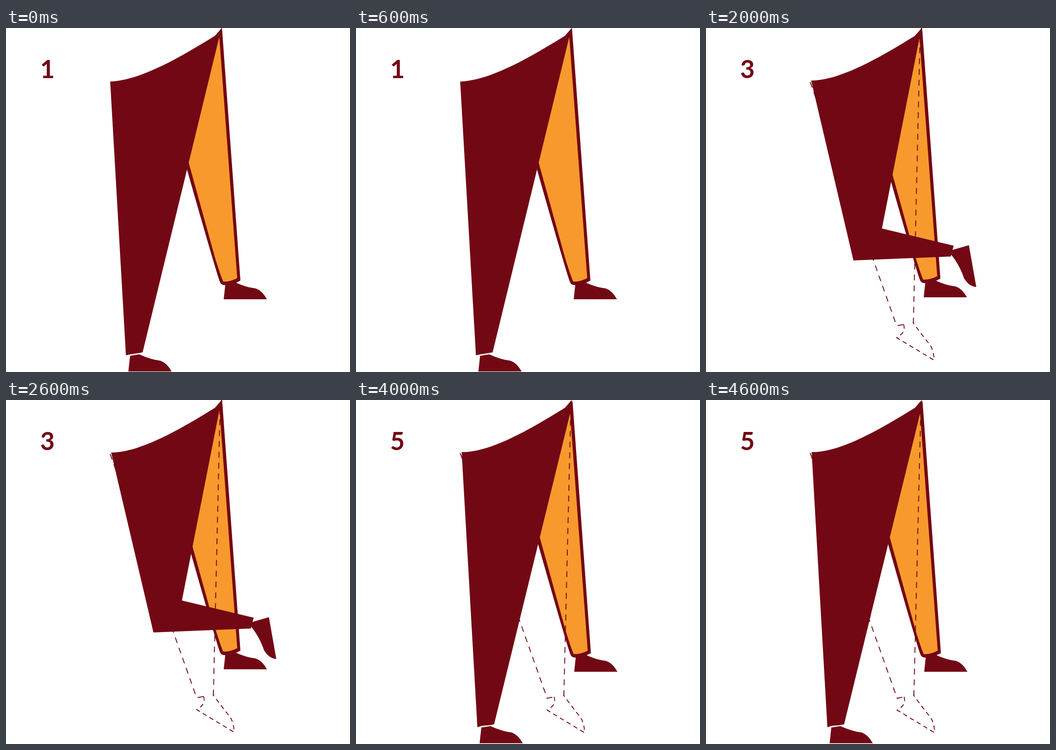
Write an HTML page that moves like this. It is 700 px wide and 700 px high and loops after 5 s.

```html
<!DOCTYPE html>
<html lang="en">
<head>
<meta charset="utf-8">
<title>Leg swing in five steps</title>
<style>
  html, body { margin: 0; width: 100%; height: 100%; overflow: hidden; background: #fff; }
  svg { display: block; width: 100vw; height: 100vh; fill: #720814; }
  text { font: bold 51px Lato, sans-serif; }
  .lining { fill: #f8992d; }
  #ghost { fill: none; stroke: #720814; stroke-width: 1.8; }
  #ghostLeg { stroke-dasharray: 12 10; }
  #ghostFoot { stroke-dasharray: 9 7; }
</style>
</head>
<body>
<svg viewBox="0 0 700 700">
  <text id="label" x="69.5" y="102"></text>
  <g id="back">
    <path d="M439.5 0L477 514L467 519Q455 524 443 523Q437 522 435 516Q428 498 368 287L350 225Z"/>
    <path class="lining" d="M434 18L470.500 509Q455 517 442 516Q437 505 425.500 468L372 275L360 230Z"/>
    <path id="backShoe"/>
  </g>
  <path id="leg"/>
  <path id="foot"/>
  <g id="ghost"><path id="ghostLeg"/><path id="ghostFoot"/></g>
</svg>
<script>
const $ = id => document.getElementById(id);
const move = (id, [x, y]) => $(id).setAttribute('transform', `translate(${x} ${y})`);
const draw = (id, d) => $(id).setAttribute('d', d);

const shoe = 'M446.500 520L443 552H531Q521 534 508 530Q489 528 465 517';
const tipped = 'M402 601Q408 617 388 628L464 674Q464 656 456 643Q438 621 421 597';
const lifted = 'M500 452L535 442L550 527Q535 526 525 509Q516 482 498 460';

// front: hip to hem; rear: hem to waist; ghost: shift of the previous pose's outline
const poses = [
  { front: '212 109L244 666L254 664', rear: '267 662L278 660L434 18',
    foot: shoe, footAt: [-194, 147], backAt: [0, 0] },
  { front: '212 108L388 604L403 601', rear: '421 597L422 598L435.500 20',
    foot: tipped, footAt: [0, 0], backAt: [-1, 0], ghost: [1, 0] },
  { front: '214 107L300 473L498 465', rear: '504 443L358 408L434 22',
    foot: lifted, footAt: [0, 0], backAt: [0, -4], ghost: [0, 2] },
  { front: '211 107L388 606L403 603', rear: '421 599L422 600L436 22',
    foot: tipped, footAt: [0, 2], backAt: [1, 1], ghost: [1, 4] },
  { front: '215 106L247 666L256 663', rear: '270 662L281 660L435.500 28',
    foot: shoe, footAt: [-191.5, 146.5], backAt: [1, 1], ghost: [1, 1] }
];

function show(step) {
  const pose = poses[step], past = poses[step - 1];
  const hip = pose.front.split('L')[0];
  $('label').textContent = step + 1;
  move('back', pose.backAt);
  draw('leg', `M${pose.front}L${pose.rear}L440 20L439 0L425 16C360 56 275 107 ${hip}Z`);
  draw('foot', pose.foot);
  move('foot', pose.footAt);
  $('ghost').style.display = past ? '' : 'none';
  if (!past) return;
  move('ghost', pose.ghost);
  draw('ghostLeg', `M${past.front}M${past.rear}`);
  draw('ghostFoot', past.foot);
  move('ghostFoot', past.footAt);
}

draw('backShoe', shoe);
const start = performance.now();
let shown = -1;
function tick() {
  const step = Math.floor((performance.now() - start) / 1000) % poses.length;
  if (step !== shown) show(shown = step);
  requestAnimationFrame(tick);
}
tick();
</script>
</body>
</html>
```
